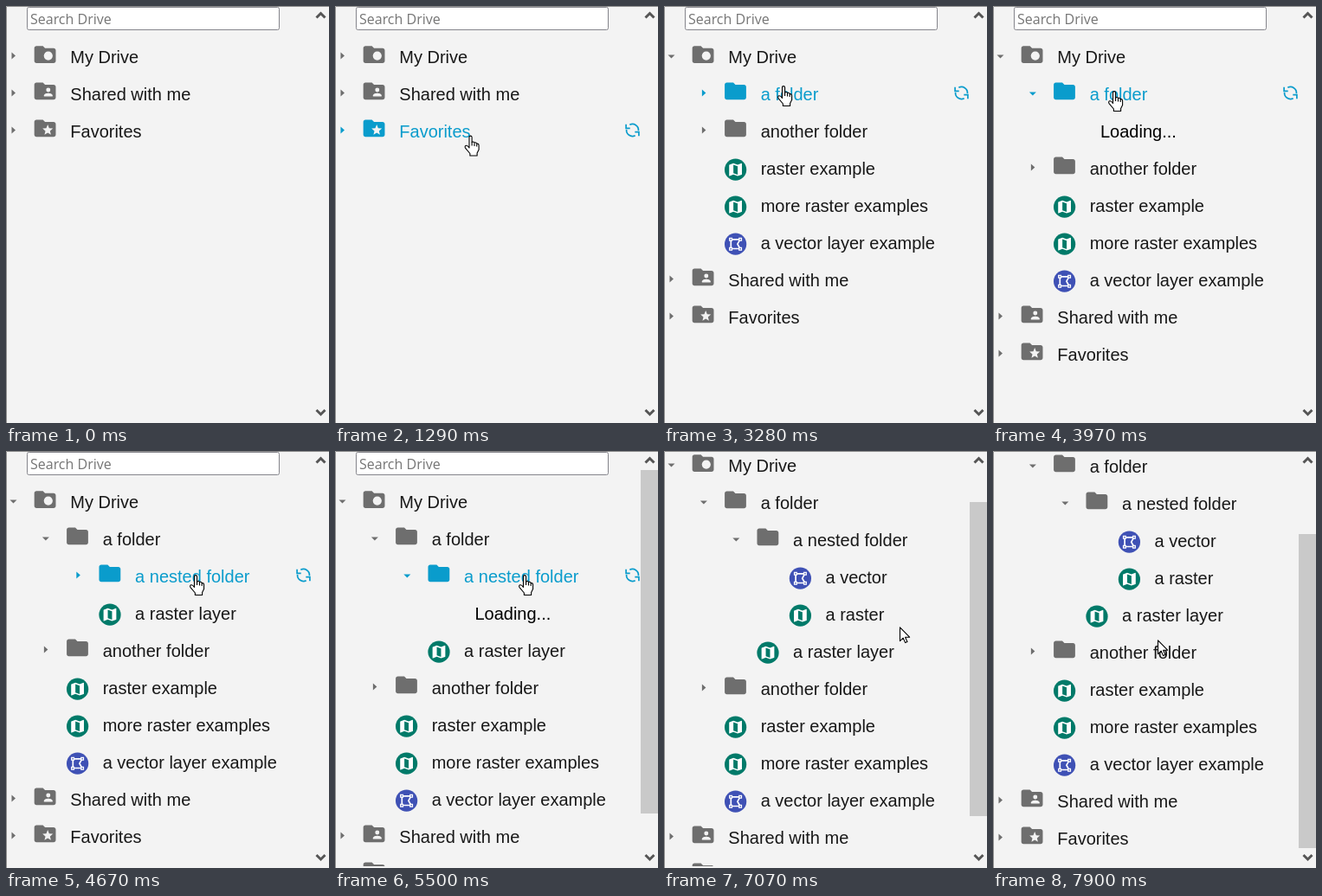
Recreate the animation shown at these times as an HTML page. Size 373 px wide and 482 px high, loop 8000 ms.

```html
<!DOCTYPE html>
<html lang="en">
<head>
<meta charset="utf-8">
<title>Drive tree</title>
<style>
  html, body { margin: 0; width: 100%; height: 100%; overflow: hidden; background: #f3f3f3; }
  svg { display: block; width: 373px; height: 482px; }
  text { font: 20px "Liberation Sans", Arial, sans-serif; fill: #181818; }
  .search { font: 16px "Open Sans", "Noto Sans", sans-serif; fill: #757575; }
  .row { fill: #6e6e6e; }
  .row.hover, .row.hover text { fill: #0a9ccc; }
  .sync { fill: none; stroke: #0a9ccc; stroke-width: 1.7; }
  .chevron { fill: none; stroke: #555; stroke-width: 3; }
  .cursor { fill: #fff; stroke: #000; stroke-width: 1.1; stroke-linejoin: round; }
</style>
</head>
<body>
<svg viewBox="0 0 373 482">
  <defs>
    <clipPath id="view"><rect width="373" height="480"/></clipPath>
    <path id="folder" d="M10 4H4c-1.1 0-2 .9-2 2v12c0 1.1.9 2 2 2h16c1.1 0 2-.9 2-2V8c0-1.1-.9-2-2-2h-8z"/>
    <g id="person" fill="#f3f3f3">
      <circle cx="15" cy="11" r="2"/>
      <path d="M19 17h-8v-1c0-1.33 2.67-2 4-2s4 .67 4 2z"/>
    </g>
    <path id="star" fill="#f3f3f3" d="M14.5 8.6l1.35 3.3 3.5.3-2.7 2.3.85 3.5-3-1.9-3 1.9.85-3.5-2.7-2.3 3.5-.3z"/>
    <circle id="badge" cx="15" cy="13.2" r="4.1" fill="#f3f3f3"/>
    <g id="raster">
      <circle r="12.6" fill="#007a69"/>
      <path transform="scale(.82) translate(-12 -12)" fill="#fff" fill-rule="evenodd"
        d="M20.5 3L15 5.1 9 3 3.4 4.9Q3 5 3 5.4V20.5q0 .5.7.5L9 18.9l6 2.1 5.6-1.9q.4-.1.4-.5V3.5q0-.5-.5-.5zM15 19l-6-2.1V5l6 2.1z"/>
    </g>
    <g id="vector">
      <circle r="12.6" fill="#3f51b5"/>
      <path d="M-5.3-5.3H5.3L2.3 0 5.3 5.3H-5.3z" fill="none" stroke="#fff" stroke-width="1.7"/>
      <path d="M-7.5-7.5h4v4h-4zM3.5-7.5h4v4h-4zM-7.5 3.5h4v4h-4zM3.5 3.5h4v4h-4z" fill="#fff"/>
      <path d="M-6.1-6.1h1.3v1.3h-1.3zM4.9-6.1h1.3v1.3H4.9zM-6.1 4.9h1.3v1.3h-1.3zM4.9 4.9h1.3v1.3H4.9z" fill="#3f51b5"/>
    </g>
    <path id="sync" class="sync" d="M-7.4-6.8v4.6h4.6M7.4 6.8V2.2H2.8M-3.2-6.2A6.9 6.9 0 0 1 6.9 .6M3.2 6.2A6.9 6.9 0 0 1-6.9-.6"/>
    <path id="arrow" class="cursor" d="M.5.8V16.6L4.2 13.1 6.6 18.6 9 17.6 6.6 12.2H11.6z"/>
    <g id="hand" class="cursor">
      <path d="M5.5 14.5V2.2Q5.5.6 7 .6T8.6 2.2V8Q10.7 6.7 11.5 8.6 13.5 7.7 14.2 9.7 16.6 9.2 16.6 11.8V16.5L14.6 20.5V23.5H6.4V21L1 14.6Q0 12.5 1.8 11.8 3.6 11.6 5.5 14.5z"/>
      <path d="M8.6 8V12M11.5 9V12.5M14.2 10V13" fill="none"/>
    </g>
    <g id="ring" fill="none">
      <circle r="10" stroke="#000"/>
      <circle r="9" stroke="#fff"/>
    </g>
  </defs>
  <rect width="373" height="482" fill="#f3f3f3"/>
  <g clip-path="url(#view)">
    <g id="page">
      <rect x="24.5" y="1.5" width="291" height="26" rx="2" fill="#fff" stroke="#85858c"/>
      <text class="search" x="28" y="21">Search Drive</text>
      <g id="tree"></g>
    </g>
  </g>
  <rect id="thumb" x="353" width="20" fill="#c9c9c9"/>
  <path class="chevron" d="M358.5 13.5l5-5 5 5M358.5 467l5 5 5-5"/>
  <path d="M.5 482V.5H373" fill="none" stroke="#8c8c8c"/>
  <g id="pointer"></g>
</svg>
<script>
const LOOP = 8000, PITCH = 43, INDENT = 37.4;
const $ = id => document.getElementById(id);
const use = (id, x, y, scale = 1) =>
  `<use href="#${id}" transform="translate(${x} ${y}) scale(${scale})"/>`;

// Rows: depth, label, icon, folder emblem
const drive = [0, 'My Drive', 'folder', 'badge'];
const folder = [1, 'a folder', 'folder'];
const nested = [2, 'a nested folder', 'folder'];
const inner = [2, 'a raster layer', 'raster'];
const loading = depth => [depth, 'Loading...'];
const rest = [
  [1, 'another folder', 'folder'],
  [1, 'raster example', 'raster'],
  [1, 'more raster examples', 'raster'],
  [1, 'a vector layer example', 'vector']
];
const roots = [
  [0, 'Shared with me', 'folder', 'person'],
  [0, 'Favorites', 'folder', 'star']
];
const open = (...rows) => [drive, folder, ...rows, ...rest, ...roots];
const lists = {
  closed: [drive, ...roots],
  drive: open(),
  wait1: open(loading(2)),
  folder: open(nested, inner),
  wait2: open(nested, loading(3), inner),
  nested: open(nested, [3, 'a vector', 'vector'], [3, 'a raster', 'raster'], inner)
};
const thumbs = { wait2: 397, nested: 363 };

// Each step changes only the properties it names
const steps = [
  [0, { list: 'closed', hover: '', cursor: '', ring: false, scroll: 0, x: 0, y: 0 }],
  [600, { cursor: 'arrow', x: 299, y: 445 }],
  [750, { x: 301, y: 440 }],
  [870, { x: 302, y: 428 }],
  [1020, { x: 258, y: 341 }],
  [1140, { x: 205, y: 240 }],
  [1290, { cursor: 'hand', x: 149.5, y: 149.5, hover: 'Favorites' }],
  [1440, { x: 126, y: 94, hover: 'Shared with me' }],
  [1590, { x: 114, y: 68, hover: 'My Drive' }],
  [1740, { x: 109.7, y: 53 }],
  [2170, { ring: true }],
  [2290, { ring: false }],
  [2440, { list: 'drive' }],
  [3130, { cursor: 'arrow', x: 126, y: 79, hover: '' }],
  [3280, { cursor: 'hand', x: 131, y: 92, hover: 'a folder' }],
  [3400, { x: 133, y: 98 }],
  [3970, { list: 'wait1' }],
  [4100, { x: 135, y: 99.5 }],
  [4250, { x: 165, y: 112.5 }],
  [4400, { cursor: 'arrow', x: 195, y: 133, hover: '' }],
  [4550, { cursor: 'hand', x: 208, y: 141, hover: 'a nested folder', list: 'folder' }],
  [4670, { x: 212, y: 143 }],
  [5500, { list: 'wait2' }],
  [5940, { x: 222, y: 153 }],
  [6090, { cursor: 'arrow', x: 240, y: 165, hover: '' }],
  [6240, { x: 255, y: 182, list: 'nested' }],
  [6370, { x: 267, y: 197 }],
  [6490, { x: 272, y: 203 }],
  [7070, { scroll: 42 }],
  [7190, { scroll: 84 }],
  [7630, { x: 240, y: 208 }],
  [7750, { x: 213, y: 214 }],
  [7900, { x: 190, y: 218 }]
];

function drawRow([depth, label, icon, emblem], i, rows, hover) {
  const x = depth * INDENT, y = 59 + i * PITCH;
  if (!icon) return `<text x="${x + 49.2}" y="${y + 7}" style="fill:#000">${label}</text>`;
  let out = `<text x="${x + 74.3}" y="${y + 7}">${label}</text>`;
  if (icon === 'folder') {
    const opened = rows[i + 1] && rows[i + 1][0] > depth;
    const top = y - (i ? 13.6 : 12.8);
    out += `<path d="${opened ? 'M4.5-2.5h8l-4 4z' : 'M6.5-5.5v8l4.5-4z'}" transform="translate(${x} ${y})"/>`;
    for (const part of ['folder', emblem]) {
      if (part) out += use(part, x + 30.2, top - 4.96, 1.24);
    }
  } else {
    out += use(icon, x + 45.2, y + 1.2);
  }
  if (label === hover) out += use('sync', 343.5, y - 1.5);
  return `<g class="row${label === hover ? ' hover' : ''}">${out}</g>`;
}

function render(s) {
  const rows = lists[s.list];
  $('tree').innerHTML = rows.map((row, i) => drawRow(row, i, rows, s.hover)).join('');
  $('page').setAttribute('transform', `translate(0 ${-s.scroll})`);
  $('thumb').setAttribute('y', 22 + s.scroll * 74 / 84);
  $('thumb').setAttribute('height', thumbs[s.list] || 0);
  $('pointer').innerHTML = (s.ring ? use('ring', s.x + 6.8, s.y + 1.5) : '') +
    (s.cursor ? use(s.cursor, s.x, s.y) : '');
}

let shown = -1;
function tick() {
  const t = performance.now() % LOOP;
  const past = steps.filter(([at]) => at <= t);
  if (past.length !== shown) {
    shown = past.length;
    render(Object.assign({}, ...past.map(([, change]) => change)));
  }
  requestAnimationFrame(tick);
}
tick();
</script>
</body>
</html>
```
